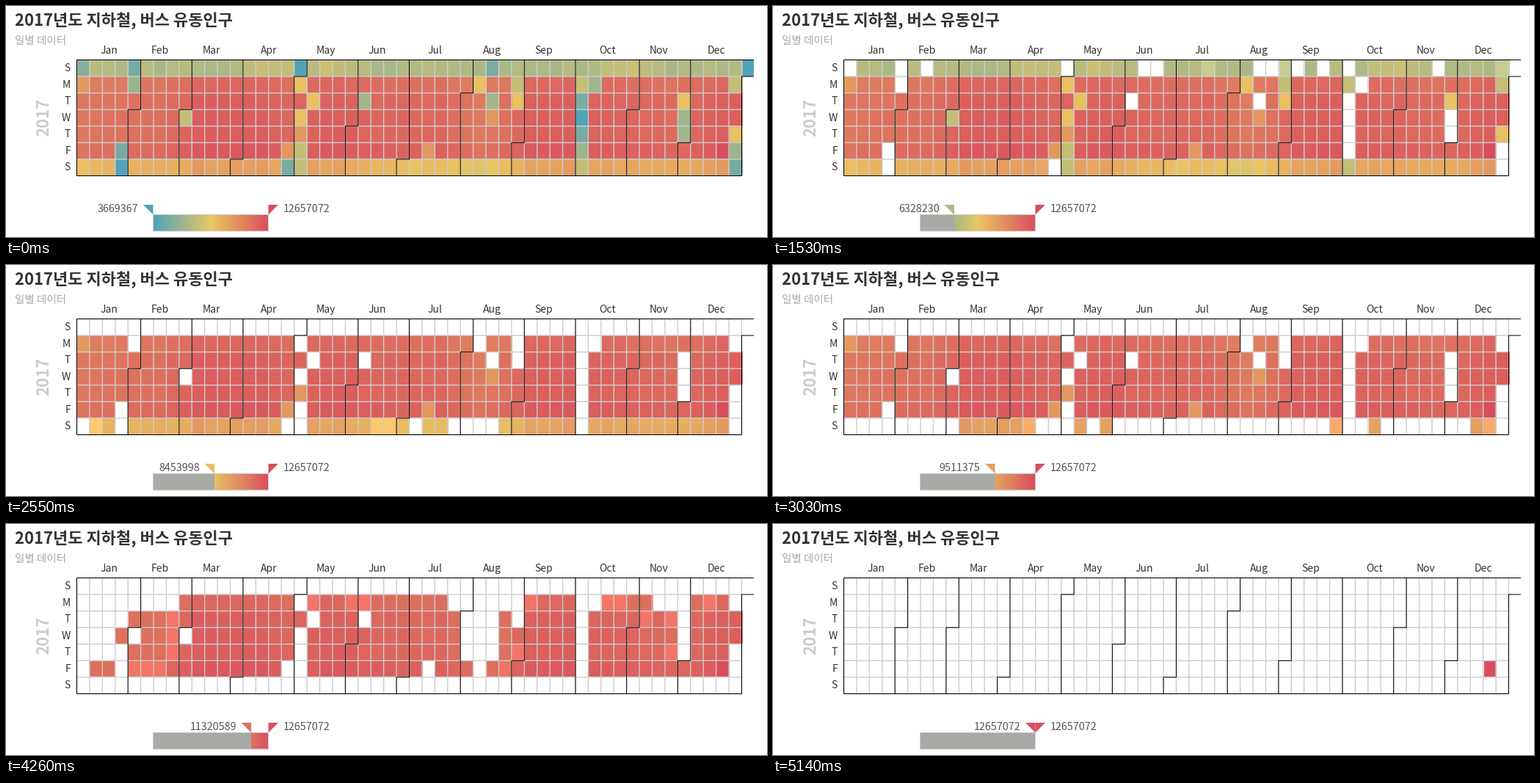
Recreate the animation shown at these times as a matplotlib script. Size 1037 px wide and 315 px high, loop 8 s.

```python
import numpy as np
import matplotlib.pyplot as plt
from matplotlib.animation import FuncAnimation
from matplotlib.collections import LineCollection
from matplotlib.colors import LinearSegmentedColormap
from matplotlib.patches import Polygon, Rectangle

W, H, DPI = 1037, 315, 128
LOOP, STEP = 8000, 20
LEFT, TOP, CELL_W, CELL_H = 96.5, 73.5, 17.423, 22.57
EDGE = 1019                              # right edge of the chart canvas
WEEKS, DAYS = 53, 7
LOW, HIGH = 3.669367, 12.657072          # millions of riders
BAR_X0, BAR_X1, BAR_Y0, BAR_Y1 = 200.5, 357.5, 284.5, 307
START, TICK, LAST = 220, 820 / 12, 72    # drag timing in ms and ticks
FONT = "Noto Sans CJK JP"
CMAP = LinearSegmentedColormap.from_list(
    "ride", ["#50a3ba", "#eac763", "#d94e5d"], N=512)

# Handle value at some ticks of the drag
KEY_TICKS = [-1, 12, 24, 41, 52, 63, 72]
KEY_VALUES = [LOW, 5.466908, 6.943460, 9.511375, 10.666937, 11.694104, HIGH]

# Working-day level through the year, by week
SEASON_WEEKS = [0, 6, 8, 9, 14, 16, 20, 23, 28, 31, 33, 35, 38, 43, 47, 50]
SEASON = [11.1, 11.4, 11.7, 12, 11.97, 11.7, 12, 11.7, 11.68, 10.95, 11.35,
          11.9, 11.97, 11.72, 11.5, 12]
WORKDAY = {1: -0.25, 2: 0, 3: 0.03, 4: 0.03, 5: 0.22}

# Quiet days of the year (from 0) by their level
QUIET = {9.9: [1, 117, 123, 194, 227],
         8.4: [120, 122, 128, 218, 240, 331, 361],
         7.1: [59, 124, 125, 239, 274, 358],
         6.1: [156, 226, 281, 332, 333]}
# Long breaks: quietest day, days before and after, level
BREAKS = [(0, 0, 0, 5.3), (27, 1, 2, LOW), (119, 1, 0, 3.75),
          (224, 0, 0, 4.9), (276, 1, 3, 3.75), (364, 2, 0, 3.72)]


def bump(x, centre, width):
    return np.exp(-((x - centre) / width) ** 2)


def make_values():
    rng = np.random.default_rng(7)
    week = np.arange(WEEKS)
    noise = rng.uniform(-1, 1, (DAYS, WEEKS))
    season = np.interp(week, SEASON_WEEKS, SEASON)
    v = season + 0.06 * noise
    for day, shift in WORKDAY.items():
        v[day] += shift
    outings = sum(bump(week, c, 1.8) for c in (14, 20, 42.5))
    v[0] = 6.5 + 0.65 * outings + 0.3 * noise[0]
    v[6] = (8.3 + 1.25 * (season - 10.9) - 0.9 * bump(week, 27, 5)
            + 0.2 * noise[6])
    year = v.T.ravel()
    for level, days in QUIET.items():
        year[days] = level
    for day, before, after, level in BREAKS:
        for d in range(-before, after + 1):
            year[day + d] = level + 1.1 * abs(d)
    year[355] = HIGH
    year[365:] = -1
    return year.reshape(WEEKS, DAYS).T


VALUES = make_values()


def scale(v):
    return (v - LOW) / (HIGH - LOW)


def cell_colors(low, dragging):
    rgba = CMAP(np.clip(scale(VALUES), 0, 1))
    gap = VALUES - low
    if dragging:                         # days near the pointer light up
        near = (gap > 0.22) & (gap < 0.32)
        rgba[near, :3] = np.minimum(rgba[near, :3] * 1.1, 1)
    rgba[gap < -1e-9] = 1
    return rgba


def col_x(c):
    return LEFT + c * CELL_W


def row_y(r):
    return TOP + r * CELL_H


def px(n):
    return n * 72 / DPI


def label(x, y, text, size, color="#333333", **kw):
    return ax.text(x, y, text, fontsize=px(size), color=color,
                   family=FONT, **kw)


def lines(paths, color, width, z):
    ax.add_collection(LineCollection(paths, colors=color, zorder=z,
                                     linewidths=px(width), snap=False))


def bar(width, **kw):
    return ax.add_patch(Rectangle((BAR_X0, BAR_Y0), width, BAR_Y1 - BAR_Y0,
                                  snap=False, **kw))


fig = plt.figure(figsize=(W / DPI, H / DPI), dpi=DPI, facecolor="white")
ax = fig.add_axes([0, 0, 1, 1])
ax.axis("off")

# Calendar cells and their grid
cells = ax.imshow(cell_colors(LOW, False), aspect="auto",
                  interpolation="nearest", zorder=1,
                  extent=(LEFT, col_x(WEEKS), row_y(DAYS), TOP))
ax.add_patch(Rectangle((EDGE, 0), W - EDGE, H, fc="white", lw=0, zorder=1.5))
right, bottom = col_x(WEEKS - 1), row_y(DAYS)
grid = [[(col_x(c), TOP), (col_x(c), bottom)] for c in range(WEEKS)]
grid += [[(LEFT, row_y(r)), (right, row_y(r))] for r in range(DAYS + 1)]
lines(grid, "#cccccc", 1.4, 2)

# Month borders and names
NAMES = "Jan Feb Mar Apr May Jun Jul Aug Sep Oct Nov Dec".split()
LENGTHS = [31, 28, 31, 30, 31, 30, 31, 31, 30, 31, 30, 31]
borders = [[(LEFT, TOP), (EDGE, TOP)],
           [(LEFT, bottom), (right, bottom)],
           [(EDGE, row_y(1)), (right, row_y(1)), (right, bottom)]]
first = 0
for name, length in zip(NAMES, LENGTHS):
    c, r = divmod(first, DAYS)
    if r:
        borders.append([(col_x(c + 1), TOP), (col_x(c + 1), row_y(r)),
                        (col_x(c), row_y(r)), (col_x(c), bottom)])
    else:
        borders.append([(col_x(c), TOP), (col_x(c), bottom)])
    last = (first + length - 1) // DAYS
    label(col_x((c + last + 1) / 2), 65, name, 14, ha="center")
    first += length
lines(borders, "black", 1, 3)

for r, letter in enumerate("SMTWTFS"):
    label(88, row_y(r) + 15.5, letter, 14, ha="right")

label(12, 27, "2017년도 지하철, 버스 유동인구", 22, weight="bold")
label(12.5, 52, "일별 데이터", 14.5, "#aaaaaa")
label(51.5, 152, "2017", 22, "#cccccc", weight="bold", rotation=90,
      ha="center", va="center")

# Range slider
ax.imshow(CMAP(np.linspace(0, 1, 315))[None], aspect="auto",
          extent=(BAR_X0, BAR_X1, BAR_Y1, BAR_Y0), zorder=1)
muted = bar(0, fc="#a8aaa6", lw=0, zorder=2)
bar(BAR_X1 - BAR_X0, fc="none", ec="#cccccc", lw=px(1), zorder=3)


def flag(x, side):
    return [(x, 271), (x + 13.5 * side, 271), (x, 284.5)]


ax.add_patch(Polygon(flag(BAR_X1, 1), fc=CMAP(1.0), lw=0, zorder=4))
low_flag = ax.add_patch(Polygon(flag(BAR_X0, -1), lw=0, zorder=4))
label(378, 281, f"{HIGH * 1e6:.0f}", 14.4, "#555555")
low_text = label(0, 281, "", 14.4, "#555555", ha="right")

ax.set_xlim(0, W)
ax.set_ylim(H, 0)


def update(i):
    t = i * STEP + STEP / 2
    tick = np.clip(np.floor((t - START) / TICK + 0.05), -1, LAST)
    low = np.interp(tick, KEY_TICKS, KEY_VALUES)
    x = BAR_X0 + scale(low) * (BAR_X1 - BAR_X0)
    cells.set_data(cell_colors(low, 0 <= tick < LAST))
    muted.set_width(x - BAR_X0)
    low_flag.set_xy(flag(x, -1))
    low_flag.set_facecolor(CMAP(float(scale(low))))
    low_text.set_x(x - 20)
    low_text.set_text(f"{low * 1e6:.0f}")
    return cells, muted, low_flag, low_text


anim = FuncAnimation(fig, update, frames=LOOP // STEP, interval=STEP,
                     init_func=lambda: update(0), repeat=True,
                     repeat_delay=0, blit=False)
plt.show()
```
